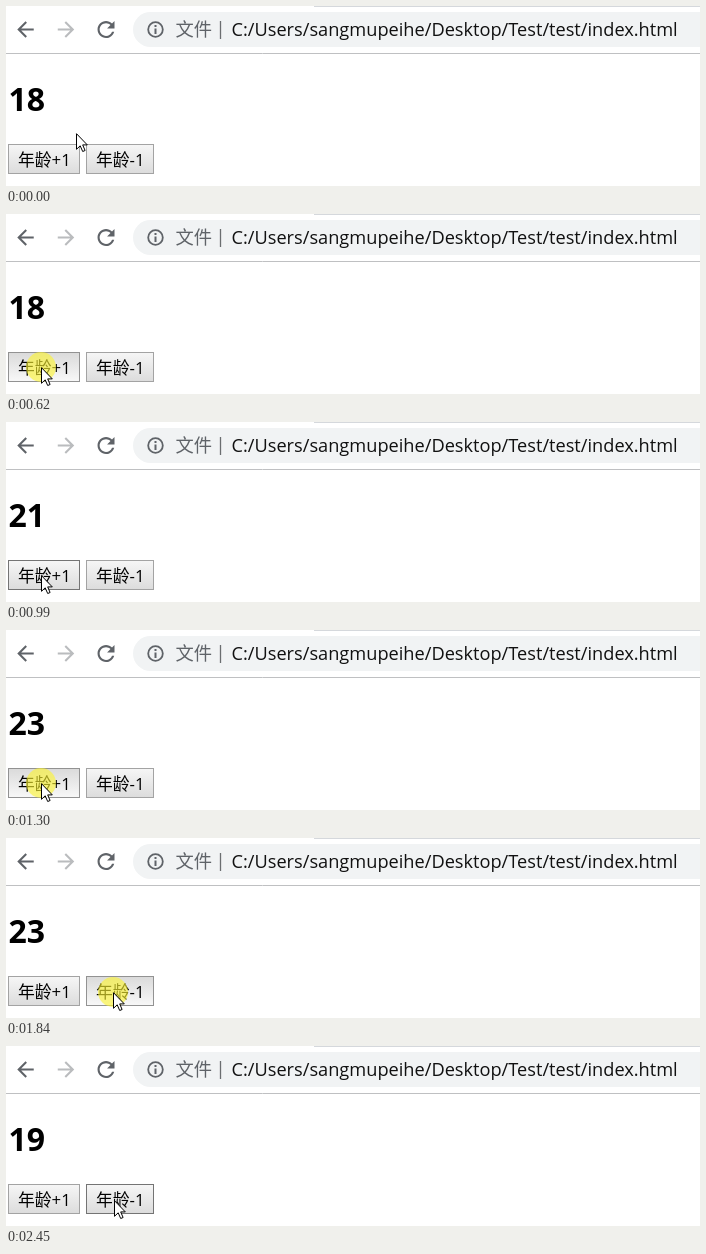
These frames come from a looping animation (694x180 px, 2.85 s). An HTML page:

```html
<!DOCTYPE html>
<html lang="zh">
<head>
<meta charset="utf-8">
<style>
  html, body { margin: 0; width: 100%; height: 100%; overflow: hidden; background: #fff; }
  svg { display: block; width: 694px; height: 180px; }
  text { font-family: "Open Sans", "Noto Sans CJK SC", "Noto Sans CJK", sans-serif; white-space: pre; }
  .icon { fill: #5f6368; }
  .btn rect { fill: url(#up); stroke: #a3a3a3; }
  .btn text { font-size: 16.8px; }
  .btn.hover rect { stroke: #747474; }
  .btn.down rect { fill: url(#down); stroke: #929292; }
</style>
</head>
<body>
<svg viewBox="0 0 694 180">
  <defs>
    <linearGradient id="up" x2="0" y2="1">
      <stop stop-color="#f6f6f6"/><stop offset="1" stop-color="#dcdcdc"/>
    </linearGradient>
    <linearGradient id="down" x2="0" y2="1">
      <stop stop-color="#dadada"/><stop offset="1" stop-color="#f8f8f8"/>
    </linearGradient>
    <path id="arrow" d="M8 -1H-4.17L1.42 -6.59L0 -8L-8 0L0 8L1.41 6.59L-4.17 1H8z"/>
  </defs>

  <path d="M308 .5H694" stroke="#d5d8dc"/>
  <path d="M0 47.5H694" stroke="#bfc0c2"/>
  <rect x="127" y="6" width="600" height="35" rx="17.5" fill="#f1f3f4"/>
  <use href="#arrow" class="icon" transform="translate(19.5 23.5) scale(1.03)"/>
  <use href="#arrow" fill="#babcbe" transform="translate(60 23.5) scale(-1.03 1.03)"/>
  <path class="icon" transform="translate(87.3 10.8) scale(1.06)" d="M17.65 6.35C16.2 4.9 14.21 4 12 4c-4.42 0-8 3.58-8 8s3.58 8 8 8c3.73 0 6.84-2.55 7.73-6h-2.08c-.82 2.33-3.04 4-5.65 4-3.31 0-6-2.69-6-6s2.69-6 6-6c1.66 0 3.14.69 4.22 1.78L13 11h7V4z"/>
  <circle cx="149.5" cy="23.5" r="7.3" fill="none" stroke="#5f6368" stroke-width="1.8"/>
  <path class="icon" d="M148.5 19h2v2h-2zM148.5 22.5h2v5.5h-2z"/>
  <text x="169.5" y="30" font-size="18.3" fill="#5f6368">文件</text>
  <path d="M214.5 15V33" stroke="#6b6e70" stroke-width="1.3"/>
  <text x="225.5" y="30" font-size="18.2" fill="#111">C:/Users/sangmupeihe/Desktop/Test/test/index.html</text>

  <text id="age" x="2.4" y="105" font-size="32" font-weight="700">18</text>
  <g class="btn"><rect x="2.5" y="138.5" width="71" height="29"/><text x="12" y="160">年龄+1</text></g>
  <g class="btn"><rect x="80.5" y="138.5" width="67" height="29"/><text x="90" y="160">年龄-1</text></g>

  <g id="pointer">
    <circle id="glow" r="15" fill="#fbf330" fill-opacity=".62"/>
    <path d="M.5 .7V16.3L4.2 12.8L6.7 18.5L9.1 17.5L6.7 11.9H11.3z" fill="#fff" stroke="#000"/>
  </g>
</svg>
<script>
const LOOP = 2850, TICK = 76.6; // ms; the screen refreshes once per tick
const PERIOD = 1.8, HOLD = 1;   // rhythm of the clicks, in ticks

// pointer key points: [tick, x, y]
const path = [[0, 70, 127], [6, 35, 153], [18, 35, 153], [21, 107, 154], [31, 107, 154], [32, 108, 154]];

const buttons = [
  { step: 1, left: 2, right: 74, start: 7.95, clicks: 6 },
  { step: -1, left: 80, right: 148, start: 21.7, clicks: 5 }
];

const byId = id => document.getElementById(id);
const age = byId("age"), glow = byId("glow"), pointer = byId("pointer");
const groups = document.querySelectorAll(".btn");
const easeOut = p => 1 - (1 - p) ** 1.5;

function pointerAt(tick) {
  const next = path.findIndex(k => k[0] > tick);
  if (next < 0) return path.at(-1).slice(1);
  const [t0, ...from] = path[next - 1], [t1, ...to] = path[next];
  const p = easeOut((tick - t0) / (t1 - t0));
  return from.map((v, i) => Math.round(v + (to[i] - v) * p));
}

function clickState(tick, { start, clicks }) {
  const since = tick - start, index = Math.floor(since / PERIOD);
  if (since < 0) return { down: false, done: 0 };
  if (index >= clicks) return { down: false, done: clicks };
  const down = since - index * PERIOD < HOLD;
  return { down, done: index + !down };
}

function draw(t) {
  const tick = Math.floor((t + 10) / TICK);
  const [x, y] = pointerAt(tick);
  let count = 18, pressed = false;
  buttons.forEach((b, i) => {
    const { down, done } = clickState(tick, b);
    const hover = x >= b.left && x < b.right && y >= 138;
    count += b.step * done;
    pressed ||= down;
    groups[i].classList.toggle("hover", hover);
    groups[i].classList.toggle("down", down);
  });
  age.textContent = count;
  glow.style.display = pressed ? "" : "none";
  pointer.setAttribute("transform", `translate(${x} ${y})`);
}

function loop() {
  draw(performance.now() % LOOP);
  requestAnimationFrame(loop);
}
loop();
</script>
</body>
</html>
```
